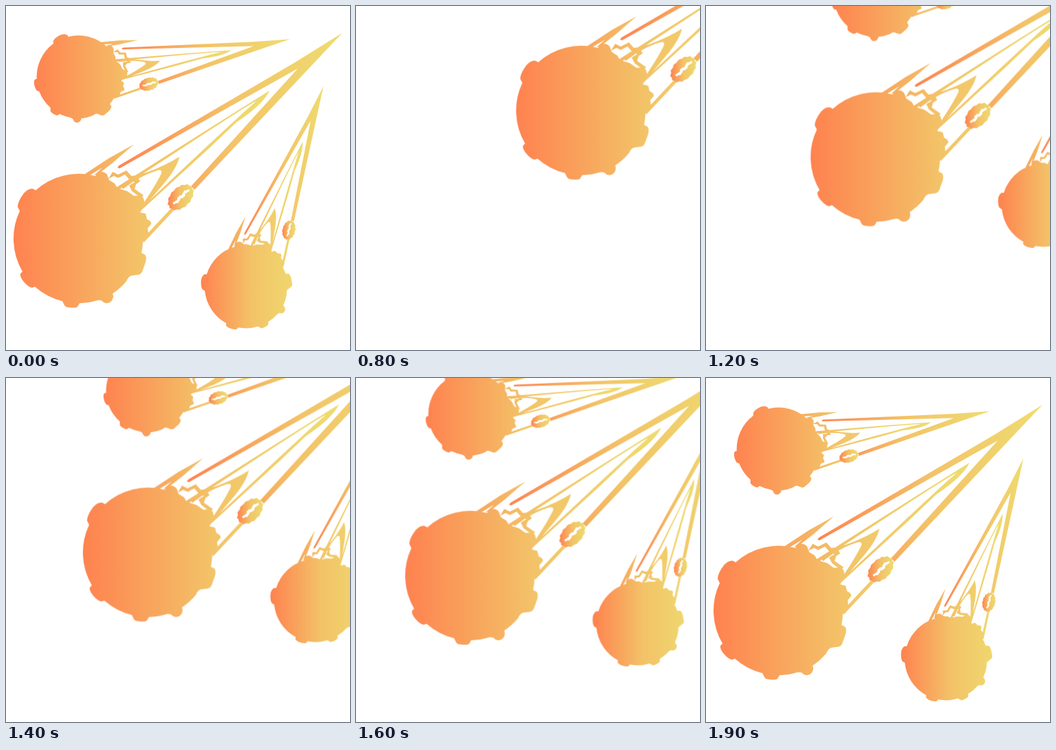
Write an HTML page that moves like this. It is 500 by 500 pixels and loops after 2 s.

```html
<!DOCTYPE html>
<html lang="en">
<head>
<meta charset="utf-8">
<title>Falling meteors</title>
<style>
  html, body { margin: 0; width: 100%; height: 100%; overflow: hidden; background: #fff; }
  svg { display: block; width: 100vw; height: 100vh; }
</style>
</head>
<body>
<svg viewBox="0 0 500 500">
  <defs>
    <linearGradient id="heat">
      <stop offset="0" stop-color="#ff8250"/>
      <stop offset=".5" stop-color="#f3c368"/>
      <stop offset="1" stop-color="#eedc70"/>
    </linearGradient>
  </defs>
  <g id="shower" fill="url(#heat)"></g>
</svg>
<script>
const shower = document.getElementById('shower');
const CENTER = [105, 338], RADIUS = 94;

// Every shape is drawn for the big meteor; "@" is an arc along its surface.
const ball = `M130,247 L134,242 Q142,239 147,245 L150,253 L158,258 L161,263 L173,259
  L166,266 L176,269 L186,276 Q199,274 200,280 L202,288 L195,300 L203,302 L205,310
  Q212,313 211,317 L206,323 L207,331 L199,338
  @197,359 L201,361 Q205,363 203,372 L198,386 Q196,391 189,391 L182,392 Q178,393 175,400
  @155,418 L156,422 Q155,431 147,432 Q142,432 139,428 L134,427.5
  @107,432 L104,437 Q102,439 95,438.5 Q86,438 85,435 L82,429
  @42,408 L38,409.5 Q33,409 26,401 Q20,394 21,389 L24,386
  @20,298 L17,292 Q17,284 26,272 Q34,264 40,266 L43,268 @130,247 Z`;
const spike = 'M112,246 L150,221 L186,201 L155,228 L133,245 L128,246 L140,235 L120,247 Z';
const crest = `M149,251 L155,241 L163,245 L175,239 L182,247 L190,246 L195,255 L189,259
  L187,266 L200,275 L196,279 L183,269 L179,261 L187,256 L179,252 L173,245 L163,250 L157,247 Z`;
const flame = `M168,263 L179,252 Q190,246 204,242 Q232,232 252,219 Q249,234 232,255
  L193,301 L197,291 Q218,260 226,243 Q227,237 220,239 Q203,244 184,256 L170,266 Z`;
const innerTrail = `M163,262 L300,175 L383,123 Q374,143 335,169 L296,206 L190,303 L191,299
  L293,203 L346,154 Q362,140 364,138 Q354,143 300,178 L168,264 Z`;
const thread = 'M198,339 L242,292 L246,295 L200,344 Z';
const outerTrail = 'M162,235 L164,232 L420,82 L489,39 L274,267 L269,262 L424,91 L165,236 Z';

function polygon(count, point) {
  const tilt = -Math.PI / 4, c = Math.cos(tilt), s = Math.sin(tilt);
  const pts = Array.from({ length: count }, (_, i) => {
    const [x, y] = point(i / count);
    return `${(254 + x * c - y * s).toFixed(2)},${(278 + x * s + y * c).toFixed(2)}`;
  });
  return `M${pts.join(' L')} Z`;
}

const pebble = polygon(112, k => {
  const a = k * 2 * Math.PI, f = 1 + .035 * Math.cos(14 * a);
  return [21.8 * f * Math.cos(a), 14.3 * f * Math.sin(a)];
});
const slit = polygon(80, k => {
  const a = k * 2 * Math.PI, x = 15.5 * Math.cos(a);
  const side = Math.sign(Math.sin(a)) * Math.sqrt(Math.abs(Math.sin(a)));
  return [x + 1, side * (2.3 + .5 * Math.cos(x * 1.3)) + .9 * Math.sin(x * .55)];
});

const parts = [
  [ball + spike + crest + flame + innerTrail + thread, 'nonzero'],
  [outerTrail, 'nonzero'],
  [pebble + slit, 'evenodd']
];

// Coordinates are turned rather than the element, so the gradient stays horizontal.
function place(d, cx, cy, scale, degrees) {
  const a = degrees * Math.PI / 180;
  const c = scale * Math.cos(a), s = scale * Math.sin(a), r = RADIUS * scale;
  return d.replace(/(-?[\d.]+),(-?[\d.]+)/g, (_, px, py) => {
    const x = px - CENTER[0], y = py - CENTER[1];
    return `${(cx + x * c - y * s).toFixed(2)},${(cy + x * s + y * c).toFixed(2)}`;
  }).replace(/@/g, `A${r} ${r} 0 0 1 `);
}

const meteors = [
  [105, 338, 1, 0],
  [105, 103, .642, 27.8],
  [349, 408, .642, -31]
];

for (const meteor of meteors) {
  for (const [d, rule] of parts) {
    const path = document.createElementNS('http://www.w3.org/2000/svg', 'path');
    path.setAttribute('d', place(d, ...meteor));
    path.setAttribute('fill-rule', rule);
    shower.append(path);
  }
}

const rest = 'translate(0px, 0px)';
shower.animate([
  { offset: 0, transform: rest },
  { offset: .3, transform: rest },
  { offset: .3, transform: 'translate(262px, -220px)', easing: 'steps(13)' },
  { offset: .95, transform: rest },
  { offset: 1, transform: rest }
], { duration: 2000, iterations: Infinity });
</script>
</body>
</html>
```
